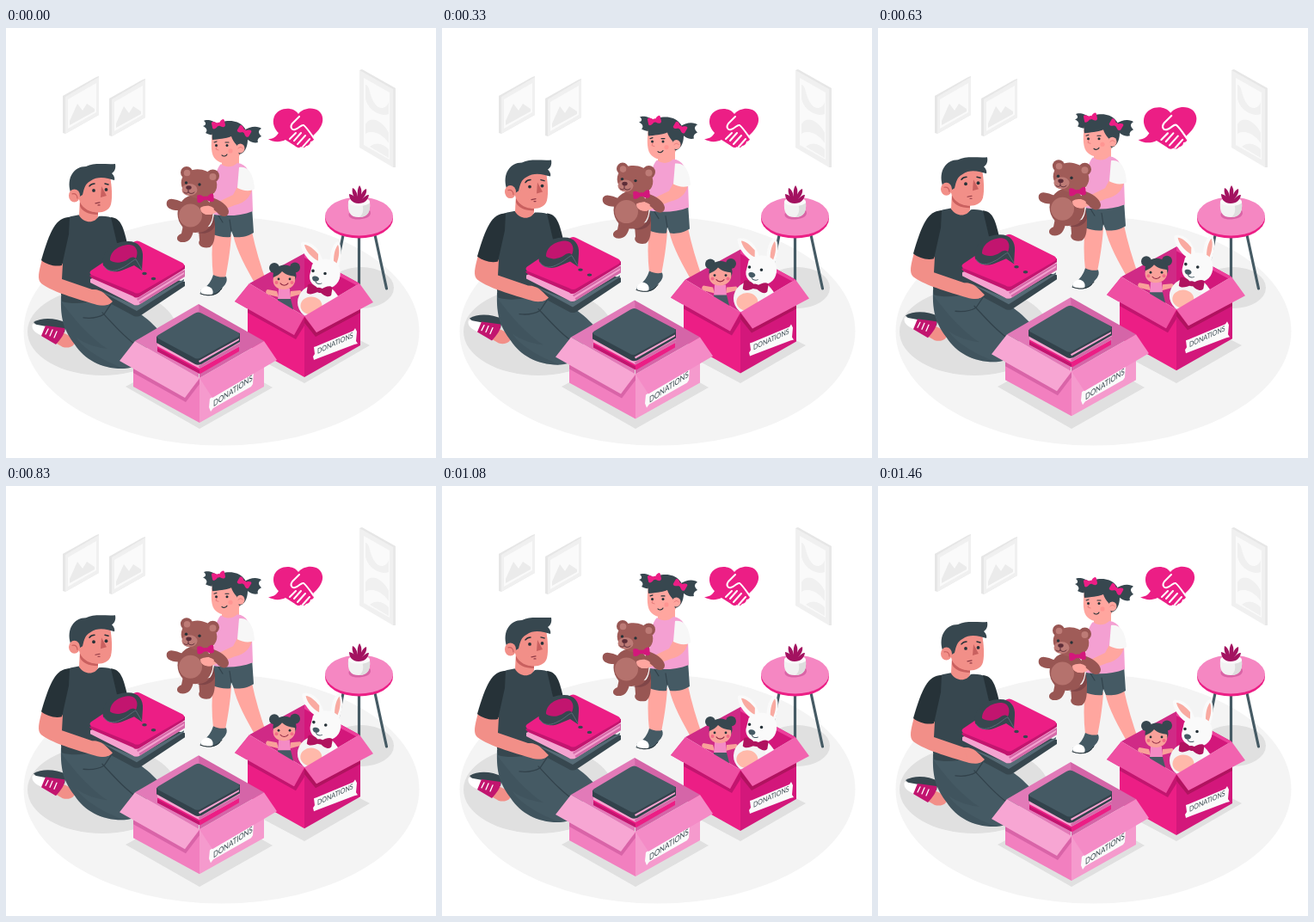
Recreate the animation shown at these times as an HTML page. Size 500x500 px, loop 1500 ms.

```html
<!DOCTYPE html>
<html lang="en">
<head>
<meta charset="utf-8">
<title>Donations</title>
<style>
html, body { margin: 0; width: 100%; height: 100%; overflow: hidden; background: #fff; }
svg { display: block; width: 100%; height: 100%; }
text { font-family: Lato, "Open Sans", sans-serif; fill: #37474f; }
.line { fill: none; stroke-linecap: round; stroke-linejoin: round; }
</style>
</head>
<body>
<svg viewBox="0 0 500 500" xmlns="http://www.w3.org/2000/svg">
<defs>
  <g id="frame">
    <path fill="#e6e6e6" d="M66 79 105 57 108 56V101L69 123 66 122Z"/>
    <path fill="#f0f0f0" d="M69 80 108 57V101L69 123Z"/>
    <path fill="#fafafa" d="M72 83 105 64V98L72 117Z"/>
    <path fill="#ebebeb" d="M74 108 83 88 89 96 94 88 103 94V97L74 113Z"/>
  </g>
  <g id="bow">
    <path d="M0 0C-4-6-9-6-9-3L-9 4C-7 7-3 4 0 1C3 5 8 7 9 3L9-4C8-7 4-5 0 0Z"/>
    <circle r="2.6"/>
  </g>
</defs>

<!-- room -->
<ellipse cx="250.500" cy="352.500" rx="230" ry="133" fill="#f4f4f4"/>
<g fill="#e0e0e0">
  <ellipse cx="112" cy="353" rx="87" ry="51"/>
  <ellipse cx="413" cy="302" rx="38" ry="24"/>
  <path d="M139 417 225 370 310 418 225 466ZM270 372 347 330 423 369 347 413Z"/>
</g>
<use href="#frame"/>
<use href="#frame" x="54" y="3"/>
<path fill="#e6e6e6" d="M411 49 414 48 453 70V162L450 161Z"/>
<path fill="#f0f0f0" d="M411 49 450 71V162L411 139Z"/>
<path fill="#e8e8e8" d="M450 71 453 70V162L450 162Z"/>
<path fill="#fafafa" d="M416 58 446 75V153L416 136Z"/>
<path fill="#f0f0f0" d="M418 66C424 66 422 84 433 92 440 95 445 90 445 84V100C434 104 420 94 418 82ZM418 112C424 101 438 108 445 122V134C438 122 424 118 418 123ZM423 138C430 132 438 134 445 141V151Z"/>

<!-- table -->
<g class="line" stroke="#455a64" stroke-width="3.200">
  <path d="M410.500 238V300M428 236 442.500 303M393 236 380 300"/>
</g>
<ellipse cx="410.500" cy="222" rx="39.500" ry="22.500" fill="#ec1e85"/>
<ellipse cx="410.500" cy="219" rx="39.500" ry="22.500" fill="#f587c2"/>
<path fill="#d964a6" d="M399 215C396 221 406 224 414 222 422 221 426 217 423 212Z"/>
<path fill="#f2f2f2" d="M398 202C397 214 400 220 410 220 421 220 424 213 423 202Z"/>
<path fill="#dedede" d="M414 204H423C424 213 421 220 411 220 416 216 416 210 414 204Z"/>
<ellipse cx="410.500" cy="202" rx="12.500" ry="5" fill="#fafafa"/>
<path fill="#a31260" d="M410 204C402 204 399 198 399 193 404 194 406 197 407 199 403 195 402 190 403 186 407 188 408 192 409 196 408 191 409 186 411 183 414 187 414 192 412 197 413 192 416 188 419 187 420 192 417 196 414 199 417 196 419 194 422 194 421 200 417 204 410 204Z"/>

<!-- heart -->
<g id="heart">
  <path fill="#ec1e85" d="M340 100C334 91 317 92 312 103 309 111 313 118 317 122 314 127 310 129 305 129 311 133 319 133 325 130L336 137C339 140 342 139 343 138 345 140 348 139 349 137 352 137 354 134 354 132 358 132 359 128 357 125 363 120 369 112 368 105 367 92 348 90 340 100Z"/>
  <g class="line" stroke="#fff" stroke-width="2">
    <path d="M341 103 333 111C330 115 332 119 336 118 341 117 343 112 346 113 349 115 353 121 358 128"/>
    <path d="M337 122 330 129M343 122 335 131M348 125 339 135M353 129 345 138"/>
  </g>
</g>

<!-- man -->
<g class="bob">
  <path fill="#f28f88" d="M62 352 82 362C80 370 74 373 66 371L54 364Z"/>
  <path fill="#37474f" d="M32 342C42 336 58 337 70 343L68 354 38 348Z"/>
  <path fill="#fff" d="M31 344 47 347 42 358C33 354 29 350 31 344Z"/>
  <path fill="#c2156f" d="M46 346 68 349C69 355 64 361 58 368L41 358Z"/>
  <path class="line" stroke="#fff" stroke-width="1.300" d="M49 350 46 356M54 351 51 358M59 353 56 360"/>
  <path fill="#455a64" d="M64 312C63 340 68 352 80 368 92 386 112 397 138 396 150 395 153 391 152 386L180 354C166 338 144 320 115 314Z"/>
  <path fill="#37474f" d="M64 318C64 340 69 352 80 368 92 386 112 397 138 396 120 390 92 376 82 360 92 368 108 372 118 373 100 362 80 340 64 318Z" opacity=".3"/>
  <path class="line" stroke="#32424b" stroke-width="1.300" d="M112 331C126 346 140 362 156 372M122 321 114 333C107 337 98 338 90 337"/>
  <path fill="#37474f" d="M70 221C78 218 85 217 90 217 96 224 104 224 108 219 121 218 130 222 133 231L140 262 126 306C110 319 82 323 65 318 62 295 62 250 70 221Z"/>
  <path fill="#263238" d="M122 220C132 221 136 228 141 251L129 250Z"/>
  <path fill="#f28f88" d="M42 269C38 284 36 292 41 297 55 308 90 317 106 322 116 324 122 321 124 317 117 309 112 304 100 304L65 292 66 274Z"/>
  <path fill="#263238" d="M74 220C58 220 51 236 41 270 47 275 57 278 65 276L73 240Z"/>
  <path fill="#f28f88" d="M86 198 85 218C91 228 104 227 107 219V208Z"/>
  <path fill="#c9605f" d="M86 202C90 210 98 214 107 214V217C96 217 88 213 86 207Z"/>
  <path fill="#f28f88" d="M86 178C90 168 110 166 121 172 123 184 124 196 122 205 119 215 107 216 98 213 89 210 84 202 84 192Z"/>
  <path fill="#37474f" d="M75 191C70 174 79 161 93 161 103 156 116 159 127 158 128 164 126 167 123 169 125 171 127 174 126 177 118 175 108 171 98 178 92 181 91 186 89 194L84 197Z"/>
  <ellipse cx="79.500" cy="195" rx="6.500" ry="7.500" fill="#f28f88"/>
  <path class="line" stroke="#c9605f" stroke-width="1.200" d="M77 193C81 192 83 195 83 198"/>
  <path fill="#c9605f" d="M111 184 117 195 110 197Z"/>
  <g fill="#263238"><circle cx="102" cy="189" r="1.900"/><circle cx="116.500" cy="188" r="1.900"/></g>
  <path class="line" stroke="#263238" stroke-width="1.500" d="M97 184C99 181 101 181 103 181M115 181 119 182"/>
  <path class="line" stroke="#8f3a45" stroke-width="1.200" d="M104 204 109 203M107 206 109 206"/>

  <path fill="#37474f" d="M104 306 150 282 208 295V300L157 334C154 336 150 336 147 334L104 311Z"/>
  <path fill="#566b76" d="M108 305 152 329 207 294V292L152 323Z"/>
  <path fill="#f5a3d0" d="M98 292 150 268 208 282V289L156 321C153 323 150 323 147 321L98 296Z"/>
  <path fill="#d56aa9" d="M152 315 208 281V289L156 321Z"/>
  <path fill="#f5a3d0" d="M153 317 207 284V286L154 319Z"/>
  <path fill="#c2156f" d="M97 288 150 258 208 276V280L156 312C153 314 150 314 148 312L100 291Z"/>
  <path fill="#ec1e85" d="M99 282 148 249C151 247 154 247 157 249L205 273C208 275 208 277 205 279L157 307C154 309 151 309 148 307L99 287C97 285 97 284 99 282Z"/>
  <path fill="#37474f" d="M113 276C110 261 124 248 142 248 154 248 160 256 159 267L158 282 149 276 137 281C128 285 119 284 113 276Z"/>
  <path fill="#c2156f" d="M121 270C121 259 132 252 144 252 153 253 154 262 151 268 146 264 143 269 138 271 131 274 125 273 121 270Z"/>
  <path class="line" stroke="#566b76" stroke-width="1" d="M114 277C119 285 128 283 135 279 142 276 147 270 151 269L158 281"/>
  <g fill="#37474f"><ellipse cx="161" cy="285.500" rx="2.800" ry="1.700"/><ellipse cx="171.500" cy="291.500" rx="2.800" ry="1.700"/></g>
  <path fill="#f28f88" d="M100 305C110 303 114 308 124 318 121 322 114 324 105 321Z"/>
</g>

<!-- girl and bear -->
<g class="bob">
  <path fill="#ffa69f" d="M264 240 286 237C290 256 296 276 303 296L292 302C280 280 268 260 264 240ZM241 236 262 240C261 258 258 276 255 291L241 289C239 272 239 254 241 236Z"/>
  <path fill="#455a64" d="M226 305C236 300 239 293 241 287 247 290 252 290 256 289 259 297 252 300 248 307 242 313 229 312 226 308Z"/>
  <path fill="#fff" d="M226 305C229 302 231 301 233 300 239 301 242 305 240 310 234 312 226 311 226 305Z"/>
  <path class="line" stroke="#263238" stroke-width="1" d="M226 309C238 313 246 310 251 303"/>
  <path fill="#455a64" d="M242 213 286 208 288 238C280 243 271 244 265 243L262 236 261 243C254 244 246 242 241 240Z"/>
  <path class="line" stroke="#32424b" stroke-width="1.100" d="M262 236 260 223M247 218 252 226"/>
  <path fill="#ffa69f" d="M251 148 271 146V160C265 166 255 165 251 160Z"/>
  <path fill="#f4a0d2" d="M250 158C256 163 264 162 269 157 280 158 285 168 286 184L287 213C272 219 256 219 242 217 242 196 240 168 250 158Z"/>
  <path fill="#37474f" d="M248 113C241 107 233 106 230 108 233 110 233 113 229 114 233 116 235 119 232 122 239 126 246 125 250 119ZM276 120C284 113 294 114 297 117 293 119 293 122 297 126 293 128 292 130 293 133 287 135 280 130 276 125Z"/>
  <path fill="#ffa69f" d="M240 122C238 135 238 148 244 153 251 160 266 158 271 149L279 135 270 118Z"/>
  <path fill="#37474f" d="M240 130C238 116 247 108 260 108 273 108 282 117 281 130 281 139 277 146 271 147L268 136C265 133 263 129 262 126 255 129 247 129 240 130Z"/>
  <ellipse cx="272.500" cy="140" rx="5" ry="5.500" fill="#ffa69f"/>
  <path class="line" stroke="#e77c7c" stroke-width="1" d="M270 140C272 138 274 138 275 140M246 136 244 141 247 142"/>
  <g fill="#263238"><circle cx="244.500" cy="136.500" r="1.500"/><circle cx="257" cy="136.500" r="1.500"/></g>
  <path class="line" stroke="#263238" stroke-width="1.100" d="M242 133 245 132M255 133 259 133M251 148C253 150 256 149 257 147"/>
  <circle cx="261" cy="143" r="2.600" fill="#ff8b8b" opacity=".6"/>
  <g fill="#ec1e85">
    <use href="#bow" transform="translate(247 112) rotate(-12) scale(.85)"/>
    <use href="#bow" transform="translate(277 120) rotate(30) scale(.85)"/>
  </g>

  <g fill="#985653">
    <circle cx="210" cy="168" r="7"/><circle cx="240.500" cy="172" r="7.500"/>
    <path d="M206 229 218 236C216 245 212 250 203 249 197 247 198 241 204 239ZM224 234 243 229C243 242 243 251 237 255 228 257 222 252 225 247Z"/>
    <path d="M207 203C198 200 190 196 187 202 185 209 192 213 204 212Z"/>
    <ellipse cx="220" cy="216" rx="20.500" ry="22"/>
  </g>
  <path fill="#804648" d="M239 201C245 220 240 238 222 238 233 241 242 236 243 228Z"/>
  <ellipse cx="214.500" cy="218" rx="13.500" ry="13.500" fill="#b5726d"/>
  <path fill="#ffa69f" d="M271 181 287 183C285 196 279 203 266 206L238 217C231 218 225 214 227 209L241 205 264 194Z"/>
  <path fill="#f7f7f7" d="M271 162C283 160 288 172 289 187 283 191 275 189 269 186Z"/>
  <path fill="#985653" d="M239 197C249 200 258 206 259 213 259 221 250 221 245 214L235 206Z"/>
  <ellipse cx="224.500" cy="181.500" rx="21" ry="17" transform="rotate(12 224.500 181.500)" fill="#a05c58"/>
  <circle cx="210.500" cy="168.500" r="3.800" fill="#bd7b76"/><circle cx="240.500" cy="173" r="4" fill="#bd7b76"/>
  <ellipse cx="213.500" cy="188" rx="9" ry="7" fill="#bd7b76"/>
  <ellipse cx="212.500" cy="185.500" rx="3.200" ry="2.300" fill="#5d2d38"/>
  <path class="line" stroke="#5d2d38" stroke-width="1" d="M212 188V191C210 193 208 192 207 191M212 191C215 194 218 192 219 191"/>
  <g fill="#263238"><circle cx="209.500" cy="180" r="1.700"/><circle cx="225" cy="182" r="1.700"/></g>
  <use href="#bow" transform="translate(232 198) rotate(-4) scale(1.080 .9)" fill="#d3177b"/>
  <path fill="#ffa69f" d="M226 209C231 206 238 206 242 210L239 217C232 218 226 215 226 209Z"/>
</g>

<!-- toy box -->
<g class="bob">
  <path fill="#d02a86" d="M283 297 347 262V335Z"/>
  <path fill="#d3177b" d="M347 262 411 297 347 335Z"/>
  <path fill="#ec3f9b" d="M283 297 266 318 280 326 283 297ZM347 262 411 297 411 301 347 267Z"/>
  <g fill="#37474f"><circle cx="312" cy="279" r="6"/><circle cx="336" cy="278.500" r="6"/><ellipse cx="324" cy="288" rx="13.500" ry="12.500"/></g>
  <path fill="#f9a19a" d="M315 306 304 304C301 306 302 309 305 310L317 313ZM331 306 342 305C345 307 344 310 341 310L330 313Z"/>
  <path fill="#f48bc5" d="M317 303H330L331 317H316Z"/>
  <path fill="#455a64" d="M316 315H331L335 331H315Z"/>
  <path fill="#f9a19a" d="M311 290C315 288 319 286 321 283 325 287 331 288 336 289 338 298 331 304 323 304 314 304 309 298 311 290Z"/>
  <g fill="#263238"><circle cx="317" cy="292" r="1.400"/><circle cx="330" cy="292" r="1.400"/></g>
  <g fill="#f36c86"><circle cx="314.500" cy="296" r="2"/><circle cx="332.500" cy="296" r="2"/></g>
  <path class="line" stroke="#8f2a45" stroke-width="1.100" d="M319 297C321 300 326 300 328 297"/>
  <g id="rabbit">
    <ellipse cx="363" cy="319" rx="24" ry="21" fill="#f4f4f4"/>
    <ellipse cx="355" cy="323" rx="12.500" ry="10.500" fill="#ffb9aa"/>
    <path fill="#fafafa" d="M374 307C384 304 390 314 387 323L378 326ZM362 277C351 271 342 258 343 250 347 247 357 250 362 257 366 263 369 270 369 275ZM377 275C376 262 380 250 386 248 391 252 391 266 386 279Z"/>
    <path fill="#f9aaa1" d="M363 271C354 266 348 258 347 252 352 252 358 257 363 263ZM381 272C381 262 383 256 386 252 388 257 388 265 384 275Z"/>
    <path fill="#fafafa" d="M356 275C365 266 382 267 387 277 391 287 388 298 378 302 366 305 352 300 353 288Z"/>
    <g fill="#263238"><circle cx="357" cy="282.500" r="1.800"/><circle cx="371" cy="285.500" r="1.800"/></g>
    <path fill="#455a64" d="M356 290C358 287 364 289 364 292 363 296 356 296 356 290Z"/>
    <path class="line" stroke="#455a64" stroke-width="1" d="M360 295C361 298 365 298 367 297"/>
    <use href="#bow" transform="translate(364.500 305) rotate(8) scale(1.600 1.150)" fill="#b0135f"/>
  </g>
  <path fill="#ec1e85" d="M281 314 347 335V406L281 369Z"/>
  <path fill="#d3177b" d="M347 335 412 314V369L347 406Z"/>
  <path fill="#c2156f" d="M281 326 335 357 347 336V346L337 362 281 331Z"/>
  <path fill="#b0135f" d="M347 336 361 354 412 327V331L360 359 347 343Z"/>
  <path fill="#ee4fa2" d="M283 297 347 335 335 357 266 318Z"/>
  <path fill="#f263af" d="M411 297 347 335 361 354 427 319Z"/>
  <path fill="#fafafa" d="M358 371 361 370 404 352 406 349 408 353 407 364 409 367 405 368 363 384 358 386 357 382 359 379Z"/>
  <text font-size="8.600" transform="matrix(.82 -.38 0 1 362 379)">DONATIONS</text>
</g>

<!-- clothes box -->
<g class="bob">
  <path fill="#e27ab8" d="M150 364 224 321V407Z"/>
  <path fill="#d565a8" d="M224 321 300 364 225 407Z"/>
  <path fill="#ec1e85" d="M176 368 223 346 271 368V376L226 402 176 376Z"/>
  <path fill="#c2156f" d="M176 372 225 398V402L176 376Z"/>
  <path fill="#f5a3d0" d="M176 364 223 342 272 360V370L225 396 176 370Z"/>
  <path fill="#d56aa9" d="M224 393 272 366V370L225 396Z"/>
  <path fill="#32424b" d="M175 359 223 338 272 355V365L227 391C224 392 222 392 220 391L175 366Z"/>
  <path fill="#f5a3d0" d="M224 387 271 361V363L225 389Z"/>
  <path fill="#455a64" d="M177 357 219 332C222 330 225 330 228 332L270 354C272 356 272 358 270 359L227 383C224 385 221 385 218 383L177 361C175 360 175 358 177 357Z"/>
  <path fill="#f27fbf" d="M148 382 225 407V459L148 417Z"/>
  <path fill="#f59acd" d="M225 407 300 380V417L225 459Z"/>
  <path fill="#d964a8" d="M148 396 208 429 225 408V414L209 435 148 401Z"/>
  <path fill="#fafafa" d="M237 431 288 400 287 414 285 417 241 442 238 446 236 441Z"/>
  <text font-size="9.800" transform="matrix(.79 -.53 0 1 241 440.500)">DONATIONS</text>
  <path fill="#f7a6d3" d="M150 364 225 407 208 430 132 387Z"/>
  <path fill="#f48bc6" d="M300 364 225 407 240 430 315 386Z"/>
</g>
</svg>
<script>
const LOOP = 1500;
const bobs = document.querySelectorAll(".bob");
const heart = document.getElementById("heart");
const rabbit = document.getElementById("rabbit");

// smooth bump of height 1 around a moment
function beat(t, at, half = 180) {
  const d = Math.abs(t - at);
  const u = Math.min(d, LOOP - d) / half;
  return u < 1 ? Math.cos(u * Math.PI / 2) ** 2 : 0;
}

function draw(t) {
  const lift = Math.sin(((t + 20) % LOOP) / LOOP * Math.PI) ** 1.5;
  bobs.forEach(g => g.setAttribute("transform", `translate(0 ${-8 * lift})`));
  rabbit.setAttribute("transform", `rotate(${1.5 * lift} 363 315)`);
  const size = 1 + 0.08 * (beat(t, 150) + beat(t, 660));
  heart.setAttribute("transform", `translate(338 117) scale(${size}) translate(-338 -117)`);
}

const start = performance.now();
function tick() {
  draw((performance.now() - start) % LOOP);
  requestAnimationFrame(tick);
}
draw(0);
requestAnimationFrame(tick);
</script>
</body>
</html>
```
